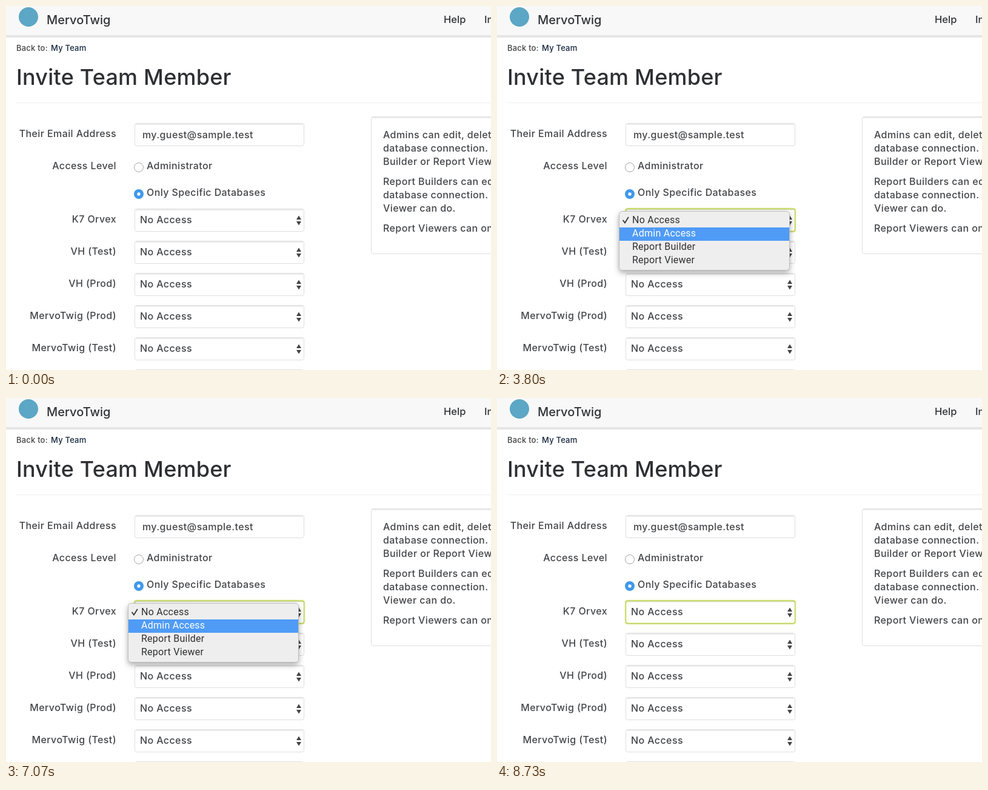
Animation, 800 px wide and 600 px high, one loop 8.79 s. Source, as an HTML page:

```html
<!DOCTYPE html>
<html lang="en">
<head>
<meta charset="utf-8">
<title>Invite Team Member</title>
<style>
  html, body { margin: 0; width: 100%; height: 100%; overflow: hidden; background: #fff; }
  svg { display: block; width: 100%; height: 100%; }
  text { font: 500 16px Inter, "Open Sans", sans-serif; letter-spacing: .025em; fill: #434548; white-space: pre; }
  .brand { font-size: 20px; letter-spacing: 0; fill: #303236; }
  .title { font-size: 36px; letter-spacing: .006em; fill: #2e3033; }
  .crumb { font-size: 13px; letter-spacing: .015em; }
  .link { fill: #16283f; }
  .label { text-anchor: end; }
  .box { fill: #fff; stroke: #dedede; }
  .inset { fill: #ececec; }
  .item { font: 400 16px Roboto, "Liberation Sans", sans-serif; letter-spacing: .25px; fill: #2f3032; }
  #menu { filter: drop-shadow(0 4px 5px rgba(0, 0, 0, .32)); }
</style>
</head>
<body>
<svg id="stage" viewBox="0 0 800 600" xmlns="http://www.w3.org/2000/svg"></svg>
<script>
const LOOP = 8790;
const OPEN_AT = 2130, CLOSE_AT = 8330;
const ITEMS = ["No Access", "Admin Access", "Report Builder", "Report Viewer"];
// [time, highlighted item]
const STEPS = [[OPEN_AT, 0], [3330, 1], [3870, 2], [4470, 3], [5870, 2], [6730, 1], [7330, 0]];

const stage = document.getElementById("stage");

function add(tag, attrs, parent = stage, content) {
  const el = document.createElementNS("http://www.w3.org/2000/svg", tag);
  for (const key in attrs) el.setAttribute(key, attrs[key]);
  if (content) el.textContent = content;
  parent.appendChild(el);
  return el;
}

const rect = (x, y, width, height, more, parent) => add("rect", { x, y, width, height, ...more }, parent);
const dot = (cx, cy, r, more) => add("circle", { cx, cy, r, ...more });
const text = (x, y, str, cls = "", parent) => add("text", { x, y, class: cls }, parent, str);

function field(x, y, w, h) {
  const box = rect(x, y, w, h, { rx: 3, class: "box" });
  rect(x + 1, y + .5, w - 2, 2, { class: "inset" });
  return box;
}

function select(y) {
  const box = field(212.5, y, 279, 37);
  text(221, y + 23.5, ITEMS[0]);
  add("path", { d: `M479 ${y + 17.5}l4-6.5 4 6.5zM479 ${y + 20.5}l4 6.5 4-6.5z`, fill: "#444" });
  return box;
}

// Header
rect(0, 0, 800, 48, { fill: "#f8f8f8" });
rect(0, 48, 800, 4, { fill: "#e6e6e6" });
dot(37, 18, 16, { fill: "#5ba7c5" });
text(67, 30, "MervoTwig", "brand");
text(722, 28, "Help", "brand").style.fontSize = "16.5px";
text(789, 28, "Invite", "brand").style.fontSize = "16.5px";

text(17, 74, "Back to:", "crumb");
text(74, 74, "My Team", "crumb link");
text(17, 130, "Invite Team Member", "title");
rect(17, 159, 783, 1, { fill: "#eeeeee" });

// Form
text(182, 216, "Their Email Address", "label");
field(212.5, 193.5, 279, 37);
text(225, 218, "my.guest@sample.test");

text(182, 269, "Access Level", "label");
dot(219, 266, 7.5, { fill: "#fff", stroke: "#a6a6a6" });
text(232, 269, "Administrator");
dot(219, 310, 8, { fill: "#3f98ea" });
dot(219, 310, 2.7, { fill: "#fff" });
text(232, 313, "Only Specific Databases");

const rows = ["K7 Orvex", "VH (Test)", "VH (Prod)", "MervoTwig (Prod)", "MervoTwig (Test)", ""];
const selects = rows.map((name, i) => {
  text(182, 357 + 53 * i, name, "label");
  return select(334.5 + 53 * i);
});

const focus = add("g", { fill: "none" });
rect(211.5, 333.5, 281, 39, { rx: 4, stroke: "#e6efb0", "stroke-width": 2 }, focus);
rect(212.5, 334.5, 279, 37, { rx: 3, stroke: "#b9d04a", "stroke-width": 1.3 }, focus);

// Side panel
field(602.5, 182.5, 300, 226);
[
  [218, "Admins can edit, delete"], [240, "database connection. They"], [262, "Builder or Report Viewer"],
  [295, "Report Builders can edit"], [317, "database connection. They"], [339, "Viewer can do."],
  [372, "Report Viewers can only"]
].forEach(([y, str]) => text(622, y, str));

// Popup menu
const menu = add("g", { id: "menu" });
rect(201.5, 338.5, 281, 97, { rx: 5, fill: "#eeeeee", stroke: "#bcbcbc" }, menu);
const bar = rect(202, 343, 280, 22, { fill: "#4f9bf6" }, menu);
const check = add("path", {
  d: "M208 353.5l3 4 5.5-9", fill: "none", "stroke-width": 1.8, "stroke-linecap": "round"
}, menu);
const items = ITEMS.map((str, i) => text(223, 358 + 22 * i, str, "item", menu));

function draw(t) {
  const open = t >= OPEN_AT && t < CLOSE_AT;
  menu.style.display = open ? "" : "none";
  focus.style.display = t >= OPEN_AT ? "" : "none";
  if (!open) return;
  const current = STEPS.filter(([at]) => at <= t).pop()[1];
  bar.setAttribute("y", 343 + 22 * current);
  items.forEach((el, i) => { el.style.fill = i === current ? "#fff" : ""; });
  check.setAttribute("stroke", current === 0 ? "#fff" : "#2f3032");
}

const start = performance.now();
function tick() {
  draw((performance.now() - start) % LOOP);
  requestAnimationFrame(tick);
}
tick();
</script>
</body>
</html>
```
